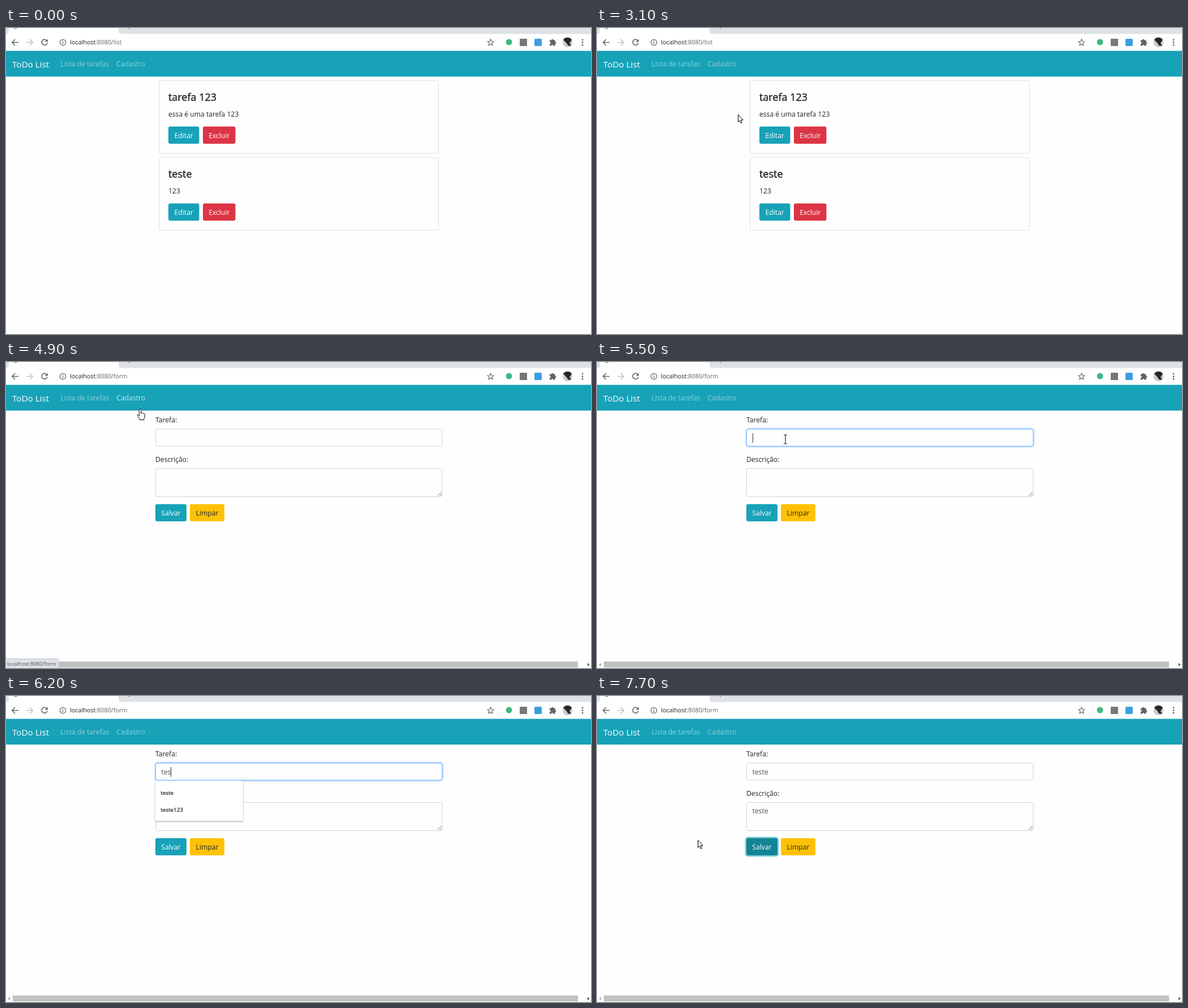
An HTML page for the animation above (8000 ms loop, 1034 px wide and 542 px high).

```html
<!DOCTYPE html>
<html lang="pt">
<head>
<meta charset="utf-8">
<title>ToDo List</title>
<style>
html, body { margin: 0; width: 100%; height: 100%; overflow: hidden; background: #fefefe; }
svg { display: block; font: 12.15px "Open Sans", "Noto Sans", sans-serif; fill: #212529; }
text { white-space: pre; }
.line { fill: none; stroke: #5f6368; stroke-width: 1.6; }
.mid { text-anchor: middle; }
.title { font-size: 18px; stroke: #212529; stroke-width: .4px; }
.box { fill: #fefefe; stroke: #ced4da; }
.typed { fill: #495057; }
#drop text { font-size: 9.8px; fill: #111; stroke: #111; stroke-width: .2px; }
</style>
</head>
<body>
<svg id="stage" width="1034" height="542" viewBox="0 0 1034 542"></svg>
<script>
const TEAL = '#17a2b8', DARK_TEAL = '#138496', RED = '#dc3545', YELLOW = '#ffc107';
const LOOP = 8000, STEP = 100;

const text = (x, y, s, attrs = '') => `<text x="${x}" y="${y}" ${attrs}>${s}</text>`;
const rect = (x, y, w, h, attrs) => `<rect x="${x}" y="${y}" width="${w}" height="${h}" ${attrs}/>`;
const button = (x, y, w, label, fill, id = '', ink = '#fff') =>
  rect(x, y, w, 30.5, `rx="3.2" fill="${fill}" id="${id}"`) +
  text(x + w / 2, y + 20, label, `class="mid" fill="${ink}"`);
const card = (y, title, body, id) =>
  rect(270.5, y + .5, 494, 129, 'rx="3.2" class="box" style="stroke:#dfdfdf"') +
  text(287, y + 36, title, 'class="title"') +
  text(287, y + 64, body) +
  button(287, y + 82, 54.5, 'Editar', TEAL, id) +
  button(348, y + 82, 57.5, 'Excluir', RED);

const browser = `
  ${rect(0, 0, 1034, 11, 'fill="#dee1e6"')}
  <path d="M0 11Q5 11 5 5V0H199V5Q199 11 206 11Z" fill="#fff"/>
  <circle cx="17" cy="-3" r="4.5" fill="#41b883"/>
  ${rect(217, 0, 1.5, 1.5, 'fill="#5f6368"')}
  ${rect(0, 10.5, 1034, 30, 'fill="#fff"')}
  <path class="line" d="M22 25.5H11M16 20L10.8 25.5L16 31"/>
  <path class="line" style="stroke:#bdc1c6" d="M36 25.5H47M42 20L47.2 25.5L42 31"/>
  <path class="line" d="M72.2 22.2A5 5 0 1 0 73 26.5"/>
  <path d="M73.8 19.5V24.6H68.7Z" fill="#5f6368"/>
  <circle class="line" style="stroke-width:1.2" cx="100.5" cy="25.5" r="5.2"/>
  <path class="line" style="stroke-width:1.3" d="M100.5 22.3v1.4M100.5 24.8v3.8"/>
  <path class="line" style="stroke-width:1.1" d="M856.5 19.8L858 23.7L862 24L859 26.7L860 30.7L856.5 28.5L853 30.7L854 26.7L851 24L855 23.7Z"/>
  <circle cx="889" cy="25" r="5.5" fill="#41b883"/>
  ${rect(908, 19, 13, 13, 'rx="1" fill="#777"')}
  ${rect(934, 19, 13, 13, 'rx="2" fill="#3b9ee0"')}
  <path d="M961 21.5h3a1.8 1.8 0 1 1 3.6 0h3v3.2a1.8 1.8 0 1 1 0 3.6v3.2h-3.2a1.7 1.7 0 0 0-3.4 0h-3v-3.2a1.8 1.8 0 0 0 0-3.6z" fill="#5f6368"/>
  <circle cx="992.5" cy="25.5" r="8.7" fill="#c9cdcf"/>
  <path d="M985 21A8.7 8.7 0 0 1 1000 21L996 27L999 31Q993 33 991 27Z" fill="#25282b"/>
  ${[21, 25.5, 30].map(y => `<circle cx="1019" cy="${y}" r="1.4" fill="#5f6368"/>`).join('')}
  ${text(113, 29.2, '<tspan fill="#202124">localhost</tspan><tspan id="path"></tspan>', 'font-size="10.8" fill="#5f6368"')}
  ${rect(0, 40.5, 1034, 45.5, `fill="${TEAL}"`)}
  ${text(11, 69.7, 'ToDo List', 'font-size="15.2" fill="#fff"')}
  ${text(96.5, 68, 'Lista de tarefas', 'id="navList" fill="#fff"')}
  ${text(195.3, 68, 'Cadastro', 'id="navForm" fill="#fff"')}`;

const list = `<g id="list">
  ${card(92.5, 'tarefa 123', 'essa é uma tarefa 123', 'edit')}
  ${card(228.8, 'teste', '123')}
</g>`;

const form = `<g id="form">
  ${text(264, 107, 'Tarefa:')}
  ${rect(264.5, 119, 506.5, 30, 'rx="3.2" class="box" id="input"')}
  ${text(274.5, 139, '', 'class="typed" id="name"')}
  ${text(264, 177, 'Descrição:')}
  ${rect(264.5, 188.5, 506.5, 50, 'rx="3.2" class="box" id="area"')}
  <path d="M763 237L770 230M767 237L770 234" stroke="#777"/>
  ${text(274.5, 208.3, '', 'class="typed" id="desc"')}
  ${button(264, 251.7, 55, 'Salvar', TEAL, 'save')}
  ${button(325, 251.7, 61, 'Limpar', YELLOW, '', '#212529')}
  <path id="caret" stroke="#333"/>
  ${rect(12, 530.5, 999, 10.5, 'fill="#c1c1c1"')}
  <path d="M7 533V539L3.5 536Z" fill="#a3a3a3"/>
  <path d="M1028 533V539L1031.5 536Z" fill="#505050"/>
</g>`;

const overlays = `
  <g id="drop"></g>
  <g id="status">
    <path id="statusBox" fill="#dee1e6" stroke="#c8cbd0"/>
    ${text(2, 538, '', 'id="statusText" font-size="9.25" fill="#4d5156"')}
  </g>
  <path id="cursor" fill="#fff" stroke="#000" stroke-linejoin="round"/>`;

document.getElementById('stage').innerHTML = browser + list + form + overlays;

const $ = id => document.getElementById(id);
const show = (id, on) => $(id).style.display = on ? '' : 'none';
const set = (id, attrs) => { for (const k in attrs) $(id).setAttribute(k, attrs[k]); };

const shapes = {
  arrow: 'M.5 .5V13.5L3.4 10.8L5.4 15.6L7.4 14.8L5.4 10H9.2Z',
  hand: 'M-1.6 12V1.6a1.6 1.6 0 0 1 3.2 0V7.5q1.5-1 2.6.4q1.4-.7 2.3.6q1.5-.3 1.5 1.5V14q0 2-1.2 3.5V19.5H-.8V17.6L-4.6 12.4q-.8-1.6.8-2q1 0 2.2 2z',
  beam: 'M-3-8h2l1 1 1-1h2M0-7V7M-3 8h2l1-1 1 1h2'
};

// Mouse path: time, x, y
const moves = [
  [700, 14, 0], [900, 48, 120], [1400, 48, 120], [1700, 24, 42], [1900, 24, 42],
  [2000, 43, 67], [2800, 322, 202], [3000, 322, 202], [3200, 176, 103], [3300, 176, 103],
  [3400, 152, 91], [3500, 152, 91], [3600, 153, 82], [3900, 154, 76], [4300, 154, 76],
  [4700, 222, 72], [4800, 227, 74], [4900, 237, 83], [5100, 238, 83],
  [5400, 333, 137], [5899, 333, 137],
  [7200, 410, 235], [7400, 308, 271], [7500, 296, 268], [7700, 178, 255], [LOOP, 178, 255]
];

function mouseAt(t) {
  if (t < 700 || (t >= 5900 && t < 7200)) return null;
  const i = moves.findIndex(m => m[0] > t);
  const [a, b] = [moves[i - 1], moves[i]];
  const k = (t - a[0]) / (b[0] - a[0]);
  return [1, 2].map(j => Math.round(a[j] + (b[j] - a[j]) * k));
}

// Text typed so far, given the time of each key press
const typed = (t, keys) => 'teste'.slice(0, keys.filter(k => k <= t).length);

function focusRing(id, on) {
  $(id).style.stroke = on ? '#80bdff' : '';
  $(id).style.filter = on ? 'drop-shadow(0 0 1.3px #80bdff) drop-shadow(0 0 1px #80bdff)' : '';
}

function drawDrop(t) {
  const on = t >= 5900 && t < 6600;
  show('drop', on);
  if (!on) return;
  const items = ['teste', 'teste123'];
  if (t < 6000) items.push('tarefa', 'tarefa 123', 'tarefa 1', 'tarefa 2');
  const h = 12 + items.length * 29.8;
  $('drop').innerHTML =
    rect(263.5, 150, 155.5, h, 'rx="2" fill="#fff" style="filter:drop-shadow(0 1px 1px #0006)"') +
    items.map((s, i) => text(273.5, 175 + i * 29.8, s)).join('');
}

function draw(now) {
  const t = Math.floor(now % LOOP / STEP) * STEP;
  const onForm = t >= 4800;
  const mouse = mouseAt(t);
  const over = (x0, y0, x1, y1) => !!mouse &&
    mouse[0] >= x0 && mouse[0] <= x1 && mouse[1] >= y0 && mouse[1] <= y1;

  const overBrand = over(11, 50, 77, 78);
  const overList = over(90, 47, 188, 84);
  const overForm = over(189, 47, 252, 84);
  const overEdit = !onForm && over(287, 175, 341, 205);
  const overSave = onForm && over(264, 252, 319, 282);
  const overInput = onForm && over(264, 119, 771, 149);

  show('list', !onForm);
  show('form', onForm);
  $('path').textContent = ':8080/' + (onForm ? 'form' : 'list');
  set('navList', { 'fill-opacity': overList ? .78 : .5 });
  set('navForm', { 'fill-opacity': overForm ? .78 : .5 });
  set('edit', { fill: overEdit ? DARK_TEAL : TEAL });

  show('status', overList || overForm);
  $('statusText').textContent = 'localhost:8080/' + (overForm ? 'form' : 'list');
  set('statusBox', { d: `M-1 525.5H${overForm ? 90 : 83}q3 0 3 3V543H-1Z` });

  const inInput = t >= 5500 && t < 6600;
  const inArea = t >= 6600 && t < 7500;
  const saved = t >= 7500;
  $('name').textContent = typed(t, [5900, 6000, 6200, 6300, 6400]);
  $('desc').textContent = typed(t, [6700, 6800, 6900, 7000, 7100]);
  focusRing('input', inInput);
  focusRing('area', inArea);
  set('save', {
    fill: saved || overSave ? DARK_TEAL : TEAL,
    stroke: saved ? '#8bd0db' : 'none', 'stroke-width': 5, 'paint-order': 'stroke'
  });

  show('caret', inInput || inArea);
  if (inInput || inArea) {
    const field = $(inInput ? 'name' : 'desc');
    const x = Math.round(274.5 + (field.textContent ? field.getComputedTextLength() : 0)) + .5;
    set('caret', { d: `M${x} ${inInput ? 126 : 196}v17` });
  }
  drawDrop(t);

  show('cursor', mouse);
  if (mouse) {
    const hand = overBrand || overList || overForm || overEdit || overSave;
    set('cursor', {
      d: shapes[hand ? 'hand' : overInput ? 'beam' : 'arrow'],
      transform: `translate(${mouse})`,
      fill: overInput ? 'none' : '#fff'
    });
  }
}

const start = performance.now();
function tick() {
  draw(performance.now() - start);
  requestAnimationFrame(tick);
}
tick();
</script>
</body>
</html>
```
